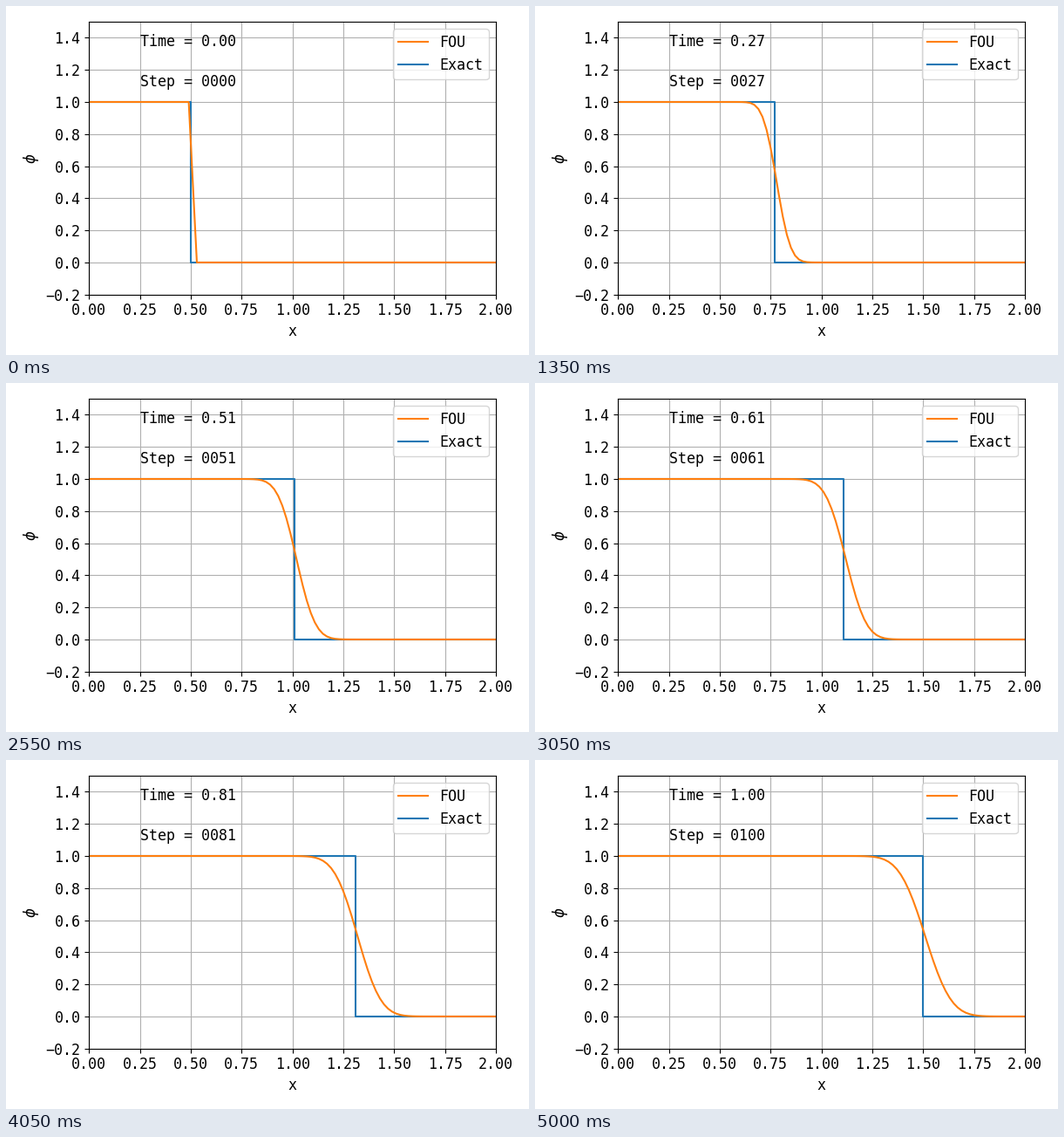
A matplotlib script for the animation above (5050 ms loop, 600 by 400 pixels).

```python
import numpy as np
import matplotlib.pyplot as plt
from matplotlib.animation import FuncAnimation

plt.rcParams.update({"font.family": "DejaVu Sans Mono", "font.size": 12})

CELLS, LENGTH = 100, 2.0
STEPS, DT, SPEED = 100, 0.01, 1.0
FRONT = 0.5

dx = LENGTH / CELLS
courant = SPEED * DT / dx
# cell centres plus one ghost cell on each side
x = (np.arange(CELLS + 2) - 0.5) * dx


def upwind(phi):
    new = phi.copy()
    new[1:] -= courant * (phi[1:] - phi[:-1])
    return new


history = [upwind(np.where(x < FRONT, 1.0, 0.0))]
for _ in range(STEPS):
    history.append(upwind(history[-1]))

fig, ax = plt.subplots(figsize=(6, 4), dpi=100)
fou, = ax.plot([], [], color="C1", zorder=2.2, label="FOU")
exact, = ax.plot([], [], color="C0", zorder=2.1, label="Exact")
time_text = ax.text(0.25, 1.35, "")
step_text = ax.text(0.25, 1.1, "")
ax.set_xlim(0, LENGTH)
ax.set_ylim(-0.2, 1.5)
ax.set_xlabel("x")
ax.set_ylabel(r"$\phi$")
ax.grid(True)
ax.legend(loc="upper right")
fig.tight_layout()


def update(n):
    t = n * DT
    edge = FRONT + SPEED * t
    fou.set_data(x, history[n])
    exact.set_data([0, edge, edge, LENGTH], [1, 1, 0, 0])
    time_text.set_text(f"Time = {t:.2f}")
    step_text.set_text(f"Step = {n:04d}")
    return fou, exact, time_text, step_text


anim = FuncAnimation(fig, update, frames=STEPS + 1, interval=50,
                     repeat=True, repeat_delay=0)
plt.show()
```
